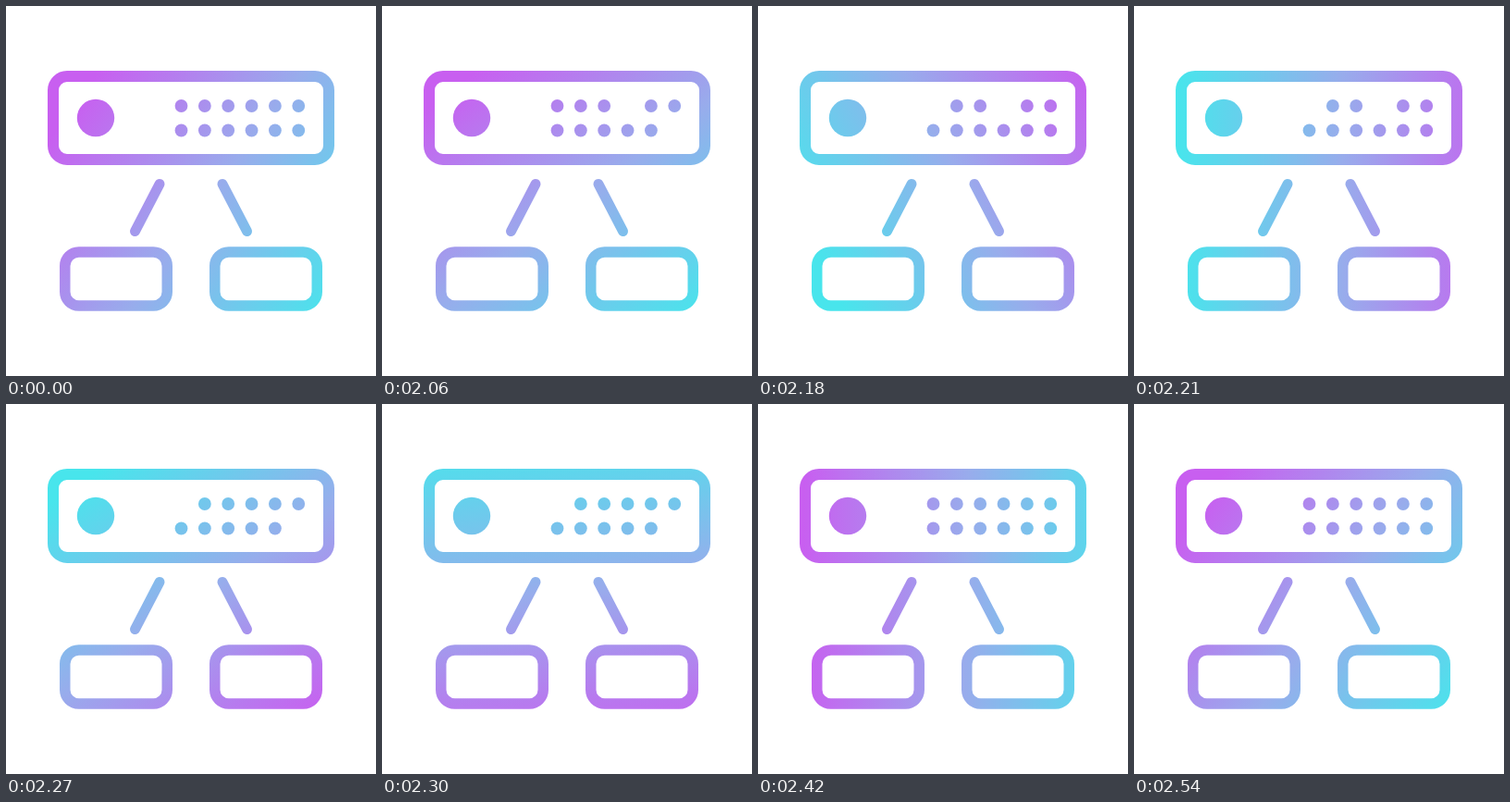
These frames come from a looping animation (400x400 px, 2.57 s). An HTML page:

```html
<!DOCTYPE html>
<html lang="en">
<head>
<meta charset="utf-8">
<title>Server icon</title>
<style>
  html, body { margin: 0; width: 100%; height: 100%; overflow: hidden; background: #fff; }
  svg { display: block; width: 100%; height: 100%; }
</style>
</head>
<body>
<svg viewBox="0 0 400 400">
  <defs>
    <linearGradient id="tint" gradientUnits="userSpaceOnUse">
      <stop offset="0" stop-color="#c85ff0"/>
      <stop offset=".5" stop-color="#98acec"/>
      <stop offset="1" stop-color="#48e5ec"/>
    </linearGradient>
    <mask id="icon" maskUnits="userSpaceOnUse" x="0" y="0" width="400" height="400">
      <g fill="none" stroke="#fff" stroke-width="11.5" stroke-linecap="round">
        <rect x="51" y="76" width="298" height="90" rx="15" stroke-width="12"/>
        <rect x="63.75" y="266" width="110.5" height="58" rx="15"/>
        <rect x="225.75" y="266" width="110.5" height="58" rx="15"/>
        <path d="M166 192.5L139.5 243.5M234 192.5L260.5 243.5" stroke-width="11"/>
      </g>
      <circle cx="97" cy="121" r="20.2" fill="#fff"/>
      <g id="dots" fill="#fff"></g>
    </mask>
  </defs>
  <rect width="400" height="400" fill="url(#tint)" mask="url(#icon)"/>
</svg>
<script>
const LOOP = 2570, HOLD = 2060, STEP = 30, LAST = 17;
const PIVOT = { x: 226, y: 200 }, REACH = 178;

// gradient direction in degrees, one entry per step
const ANGLES = [36, 53, 71, 92, 121, 152, 180, 208, 235, 263, 291, 317, 341, 361, 376, 387, 393, 395];

// dot index -> step ranges in which it is off
const BLINKS = {
  0: [[2, 13]],
  3: [[1, 3], [5, 7], [10, 12]],
  11: [[1, 4], [7, 13]]
};

const tint = document.getElementById('tint');
const group = document.getElementById('dots');

const dots = Array.from({ length: 12 }, (_, i) => {
  const dot = document.createElementNS('http://www.w3.org/2000/svg', 'circle');
  dot.setAttribute('cx', 189.5 + (i % 6) * 25.35);
  dot.setAttribute('cy', i < 6 ? 108 : 134.5);
  dot.setAttribute('r', 6.9);
  return group.appendChild(dot);
});

function stepAt(t) {
  return t < HOLD ? 0 : Math.min(LAST, Math.floor((t - HOLD) / STEP) + 1);
}

function draw(step) {
  const a = ANGLES[step] * Math.PI / 180;
  const dx = Math.cos(a) * REACH, dy = Math.sin(a) * REACH;
  tint.setAttribute('x1', PIVOT.x - dx);
  tint.setAttribute('y1', PIVOT.y - dy);
  tint.setAttribute('x2', PIVOT.x + dx);
  tint.setAttribute('y2', PIVOT.y + dy);
  for (const i in BLINKS) {
    const off = BLINKS[i].some(([from, to]) => step >= from && step < to);
    dots[i].setAttribute('opacity', off ? 0 : 1);
  }
}

const start = performance.now();
let shown = -1;

function tick() {
  const step = stepAt((performance.now() - start) % LOOP);
  if (step !== shown) draw(shown = step);
  requestAnimationFrame(tick);
}
tick();
</script>
</body>
</html>
```
